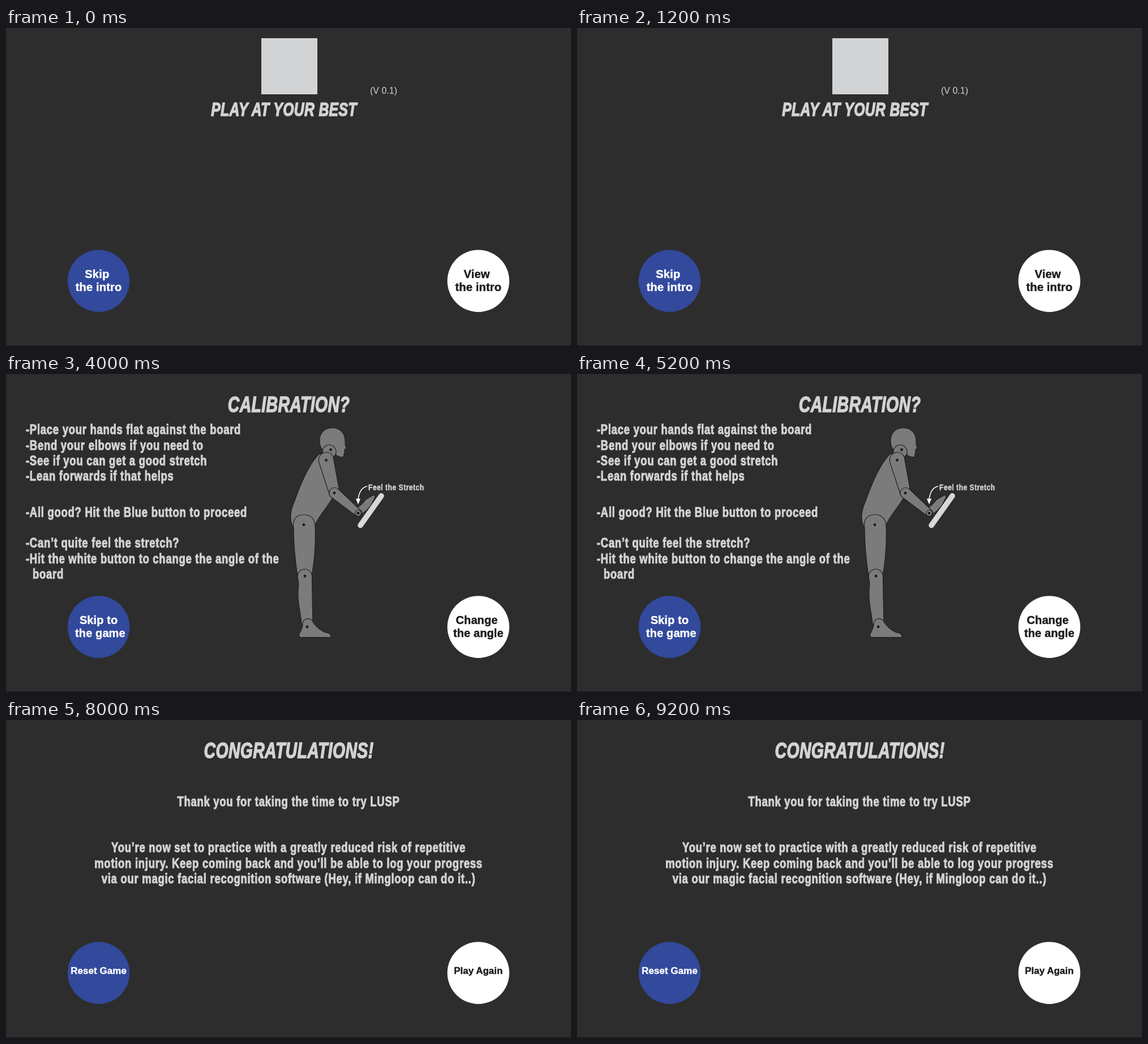
An HTML page that plays this animation: 998 px wide and 561 px high, repeating every 10000 ms.

```html
<!DOCTYPE html>
<html lang="en">
<head>
<meta charset="utf-8">
<title>Stretch game screens</title>
<style>
  html, body { margin: 0; width: 100%; height: 100%; overflow: hidden; background: #2d2d2d; }
  svg { display: block; width: 100vw; height: 100vh; }
  text { font-family: "Liberation Sans", Arial, sans-serif; font-weight: bold; fill: #d1d3d4; white-space: pre; }
  .title { font-size: 38.4px; font-style: italic; letter-spacing: .5px; stroke: #d1d3d4; stroke-width: 1.6; }
  .body { font-size: 23.6px; letter-spacing: .9px; stroke: #d1d3d4; stroke-width: 1; }
  .small { font-size: 15.4px; letter-spacing: .6px; stroke: #d1d3d4; stroke-width: .5; }
  .note { font-size: 26.6px; letter-spacing: .3px; fill: #ed1c24; stroke: #ed1c24; stroke-width: 1.1; }
  .version { font-size: 16px; font-weight: normal; }
  .em { font-style: italic; }
  .big { font-size: 30.6px; }
  .blue, .white { stroke-width: .45; letter-spacing: .1px; }
  .blue { fill: #fff; stroke: #fff; }
  .white { fill: #1d1b1c; stroke: #1d1b1c; }
  .figure { fill: #7b7b7b; stroke: #1c1c1c; stroke-width: 1.1; stroke-linejoin: round; }
  .figure .dot { fill: #1c1c1c; stroke: none; }
  .board { stroke: #d8d8d8; stroke-linecap: round; }
  .sketch { fill: none; stroke: #000; stroke-width: 2.5; stroke-linecap: round; stroke-linejoin: round; }
  .ban { fill: none; stroke: #ed1c24; stroke-width: 7; opacity: .45; }
  .scene { visibility: hidden; animation: show 10s step-end infinite; }
  @keyframes show {
    0% { visibility: visible; }
    20%, 100% { visibility: hidden; }
  }
</style>
</head>
<body>
<svg id="stage" viewBox="0 0 998 561" preserveAspectRatio="none"></svg>
<script>
// Condensed text: one horizontal scale per style.
const squeeze = { title: .74, note: .74, body: .785, small: .79 };

function text(style, x, y, str, anchor = 'middle', size = '') {
  const css = size && ` style="font-size:${size}px"`;
  return `<text class="${style}" text-anchor="${anchor}"${css} ` +
    `transform="translate(${x} ${y}) scale(${squeeze[style] || 1} 1)">${str}</text>`;
}
const title = (y, str) => text('title', 499.5, y, str);
const centred = (x, rows) => rows.map(([y, str]) => text('body', x, y, str)).join('');
const list = (x, rows) => rows.map(([y, str, dx = 0]) => text('body', x + dx, y, str, 'start')).join('');

// Each label row: [baseline, text, offset from the centre]
function button(style, size, rows) {
  const x = style === 'blue' ? 163.6 : 834.3;
  const fill = style === 'blue' ? '#32499c' : '#fff';
  return `<circle cx="${x}" cy="446.3" r="54.7" fill="${fill}"/>` +
    rows.map(([y, str, dx = 0]) => text(style, x + dx, y, str, 'middle', size)).join('');
}

// Jointed mannequin, drawn in its standing pose.
const joints = {
  neck: [573.5, 133.5], shoulder: [565.5, 152], elbow: [580, 210], wrist: [622, 245.5],
  hip: [526, 266], knee: [528, 356.5], ankle: [532, 446]
};
const shapes = {
  head: 'M554 119C553 104 563 95 577 95C591 95 599 106 599 118C599 124 599 126 601.5 131L598 133L598 138L596 146Q589 148 583 143Q578 139 570 139C560 138 554 130 554 119Z',
  torso: 'M552 142C535 160 522 190 509 226C500 246 502 262 508 272L545 270C550 252 568 236 580 213L578 150Q568 134 552 142Z',
  arm: 'M552.5 155C551 145 558 138 566 138C574 138 579 145 579 152L589 207A9.3 9.3 0 0 1 571.5 213Z',
  fore: 'M574 217A9.3 9.3 0 0 1 587 203L626 240A6 6 0 0 1 618 250Z',
  hand: 'M617 242Q620 235 628 230L636 221L649 213.5Q653 214 651 219L645 231Q638 241 628 247Z',
  thigh: 'M508 272C505 256 514 248 526 248C539 248 546 257 546 268Q548 310 540 357L515 357Q508 310 508 272Z',
  shin: 'M515 357A12.6 12.6 0 0 1 540.5 357Q541 400 542 440L522 441C520 415 513 400 517 370Z',
  foot: 'M524 444A9.5 9.5 0 0 1 543 439Q553 452 564 456Q575 457 574 464.5L520 464.5Q515 461 520 455Z'
};
const part = name => `<path d="${shapes[name]}"/>`;

function turn(joint, angle, inner) {
  const [x, y] = joints[joint];
  return `<g transform="rotate(${angle} ${x} ${y})">${inner}` +
    `<circle class="dot" cx="${x}" cy="${y}" r="2.4"/></g>`;
}

// Pose angles are absolute turns away from the standing pose; x, y is the hip.
function figure(x, y, scale, pose = {}) {
  const { torso = 0, head = 0, arm = 0, fore = 0, hand = 0, thigh = 0, shin = 0, foot = 0 } = pose;
  const headPart = turn('neck', head - torso, part('head') + '<circle cx="571" cy="137" r="12"/>');
  const armPart = turn('shoulder', arm - torso, part('arm') +
    turn('elbow', fore - arm, turn('wrist', hand - fore, part('hand')) + part('fore') +
      '<circle cx="622" cy="245.5" r="5.5"/><circle class="dot" cx="622" cy="245.5" r="2.4"/>'));
  const body = turn('hip', torso, part('torso') + headPart + armPart);
  const leg = turn('hip', thigh, part('thigh') +
    turn('knee', shin - thigh, part('shin') + turn('ankle', foot - shin, part('foot'))));
  return `<g class="figure" transform="translate(${x} ${y}) scale(${scale}) translate(-526 -266)">${body}${leg}</g>`;
}
const board = (x1, y1, x2, y2, w = 4.6) =>
  `<path class="board" stroke-width="${w}" d="M${x1} ${y1}L${x2} ${y2}"/>`;
const ban = x => `<g class="ban"><circle cx="${x}" cy="383.6" r="58.6"/><path d="M${x - 42} 425.6L${x + 42} 341.6"/></g>`;
const pushArrow = (x, y, angle) =>
  `<path fill="#6c6c6c" transform="translate(${x} ${y}) rotate(${angle})" d="M-2-5h4v5h3l-5 5l-5-5h3z"/>`;
const tiltArrow = (x, y) =>
  `<path fill="#fff" transform="translate(${x} ${y})" d="M-5-9Q5-6 3 6L-1 8Q2-2-5-9Z"/>`;

const stretchSketch = `<g class="sketch">
  <path d="M842 136Q860 131 875 122Q888 113 889 103Q891 89 903 83Q911 81 911 88Q908 95 905 104Q908 111 917 110"/>
  <path d="M861 162Q875 151 889 149Q903 155 918 152"/>
  <path d="M917 152Q914 130 918 112Q921 104 924 112Q921 132 923 153M924 112Q929 104 932 112Q929 135 931 156M932 112Q937 106 939 114Q937 138 939 159M939 120Q944 116 945 124Q942 144 946 158M945 128Q951 124 951 133L949 152"/>
  <path d="M919 158Q921 175 922 190Q921 207 916 214Q905 210 889 213"/>
  <path d="M946 158Q953 166 959 155Q967 150 969 156Q967 167 957 172Q957 196 949 216Q943 233 933 237Q916 238 898 242"/>
  <path d="M982 134H958M967 126L957 134L967 142"/>
</g>`;

const name = 'LUSP';
const emName = `<tspan class="em">${name}</tspan>`;
const proceed = [[432.5, 'Hit any', -.5], [450.5, 'button to'], [468.5, 'proceed']];

const scenes = [
  '<rect x="451" y="18" width="99" height="99" fill="#d1d3d4"/>' +
  text('title', 491, 155, 'PLAY AT YOUR BEST', 'middle', 33.4) +
  text('version', 643, 115.5, '(V 0.1)', 'start') +
  button('blue', 20.2, [[440.7, 'Skip', -2.8], [464, 'the intro']]) +
  button('white', 20.2, [[440.7, 'View', -2.8], [464, 'the intro']]),

  title(66.5, `WHAT IS ${name}?`) + title(218.5, 'HOW DOES IT WORK?') +
  centred(461, [
    [90, `${emName} is a fun way to stretch before practicing, in order to avoid Repetitive`],
    [117, 'Motion Injuries, and always play at your best.'],
    [171.5, `This version of ${emName} focuses on one particular stretch, wrist extension`],
    [251.5, 'It’s really simple, you’ll put your palms flat against the board, and use the board'],
    [279, 'to stretch for 30 seconds.'],
    [306, `${name} will show you how much you’re stretching by varying the height of this ball`]
  ]) +
  '<circle cx="872" cy="300.7" r="16.4" fill="#da1a1c"/>' + stretchSketch +
  button('blue', 15.6, proceed) + button('white', 15.6, proceed),

  title(67, 'CALIBRATION?') +
  list(35, [
    [106, '-Place your hands flat against the board'],
    [133.5, '-Bend your elbows if you need to'],
    [160.5, '-See if you can get a good stretch'],
    [188, '-Lean forwards if that helps'],
    [251.5, '-All good? Hit the Blue button to proceed'],
    [306, '-Can’t quite feel the stretch?'],
    [333.5, '-Hit the white button to change the angle of the'],
    [360.5, 'board', 12]
  ]) +
  figure(526, 266, 1) + board(626, 267, 663, 215, 9.5) +
  '<path d="M638 198Q624 201 622 222" fill="none" stroke="#fff" stroke-width="1.6"/>' +
  '<path d="M618 220L622 230L626 220Z" fill="#fff"/>' +
  text('small', 640, 204.5, 'Feel the Stretch', 'start') +
  button('blue', 20, [[440.7, 'Skip to'], [463.5, 'the game', 2.8]]) +
  button('white', 20, [[440.7, 'Change', -2.8], [463.5, 'the angle']]),

  title(66, 'CALIBRATION') +
  list(36, [
    [99, '-Push against the board gently'],
    [126, '-The board will tilt towards you'],
    [153.5, '-keep pressing till you find a good angle'],
    [181, '-take your hands off'],
    [208, '-Want to try again? Blue button'],
    [235.5, '-All Good? White button']
  ]) +
  figure(474, 164, .488, { hand: 36 }) + board(523, 163.5, 551, 150) + pushArrow(531, 143, -35) +
  figure(570, 164, .488) + board(619, 164, 636, 140) + tiltArrow(637, 159) +
  figure(656, 162.5, .488, { torso: -3, arm: 4, fore: -4, hand: -31 }) + board(704, 162, 712.5, 132.5) + tiltArrow(716, 155) +
  figure(738.5, 161, .488, { torso: -18, arm: 14, fore: -39, hand: 24 }) + board(789, 162, 797, 133) + pushArrow(783, 139, 140) +
  figure(327, 399, .567, { torso: -3, arm: -24, fore: 29, hand: -19 }) + board(385, 400, 396, 365, 5.4) +
  figure(452, 394.5, .567, { torso: 91, head: 91, arm: 120, fore: -80, hand: -24 }) + board(510, 395, 520, 360, 5.4) +
  figure(596, 352, .567, { torso: 153, head: 155, arm: -36, fore: -51, hand: 31, thigh: -66, shin: -30, foot: -7 }) +
  board(659, 445.5, 691, 430, 5.4) +
  [354, 488.3, 634.7].map(ban).join('') +
  text('note', 495, 550, 'NOTE: <tspan class="big">DON’T</tspan> USE YOUR WEIGHT! STRETCH, DON’T PUSH') +
  button('blue', 25, [[441.3, 'Reset'], [469.7, 'angle']]) +
  button('white', 18.2, [[433.3, 'Proceed'], [454.7, 'to the'], [475, 'game']]),

  title(67, 'CONGRATULATIONS!') +
  centred(499, [
    [152, `Thank you for taking the time to try ${name}`],
    [233, 'You’re now set to practice with a greatly reduced risk of repetitive'],
    [260.5, 'motion injury. Keep coming back and you’ll be able to log your progress'],
    [288, 'via our magic facial recognition software (Hey, if Mingloop can do it..)']
  ]) +
  button('blue', 16.9, [[448, 'Reset Game']]) +
  button('white', 16.8, [[448, 'Play Again']])
];

document.getElementById('stage').innerHTML =
  '<rect width="998" height="561" fill="#2d2d2d"/><rect y="560" width="998" height="1" fill="#191919"/>' +
  scenes.map((s, i) => `<g class="scene" style="animation-delay:${i * 2 - 10}s">${s}</g>`).join('');
</script>
</body>
</html>
```
